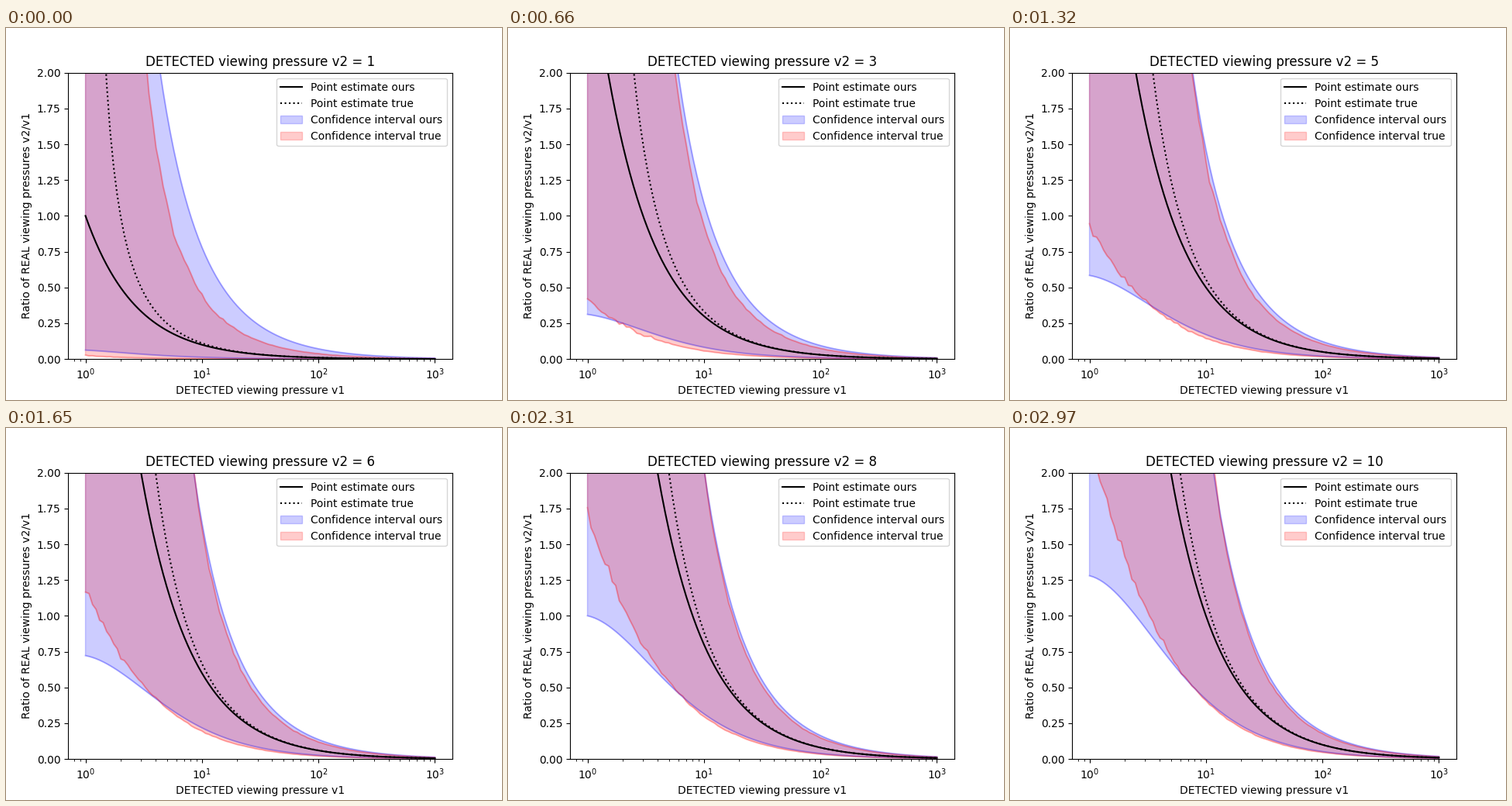
A matplotlib script for the animation above (3.3 s loop, 640 px wide and 480 px high).

```python
import numpy as np
import matplotlib.pyplot as plt
from matplotlib.animation import FuncAnimation

Z = 1.96
SAMPLES = 20000
ALPHA = 0.2
v1 = np.logspace(0, 3, 100)


def log_interval(v2):
    """Normal approximation of the log ratio of two Poisson rates."""
    spread = np.exp(Z * np.sqrt(1 / v1 + 1 / v2))
    return v2 / v1 / spread, v2 / v1 * spread


def sampled_interval(v2):
    """Percentiles of a ratio of gamma variates, one independent draw per v1."""
    rng = np.random.default_rng(v2)
    bounds = [np.percentile(rng.gamma(v2, size=SAMPLES) / rng.gamma(v, size=SAMPLES),
                            [2.5, 97.5]) for v in v1]
    return np.transpose(bounds)


intervals = {v2: (log_interval(v2), sampled_interval(v2)) for v2 in range(1, 11)}
fig, ax = plt.subplots(figsize=(6.4, 4.8), dpi=100)


def band(bounds, color, label):
    ax.fill_between(v1, *bounds, color=color, alpha=ALPHA, label=label)
    for bound in bounds:
        ax.plot(v1, bound, color=color, alpha=ALPHA)


def draw(frame):
    v2 = frame + 1
    ours, true = intervals[v2]
    ax.clear()
    ax.set_xscale("log")
    band(ours, "blue", "Confidence interval ours")
    band(true, "red", "Confidence interval true")
    ax.plot(v1, v2 / v1, "k-", label="Point estimate ours")
    ax.plot(v1[1:], v2 / (v1[1:] - 1), "k:", label="Point estimate true")
    ax.set_ylim(0, 2)
    ax.set_title(f"DETECTED viewing pressure v2 = {v2}")
    ax.set_xlabel("DETECTED viewing pressure v1")
    ax.set_ylabel("Ratio of REAL viewing pressures v2/v1")
    handles, labels = ax.get_legend_handles_labels()
    order = [2, 3, 0, 1]
    ax.legend([handles[i] for i in order], [labels[i] for i in order], loc="upper right")


anim = FuncAnimation(fig, draw, frames=10, init_func=lambda: None,
                     interval=330, repeat=True, repeat_delay=0)
plt.show()
```
